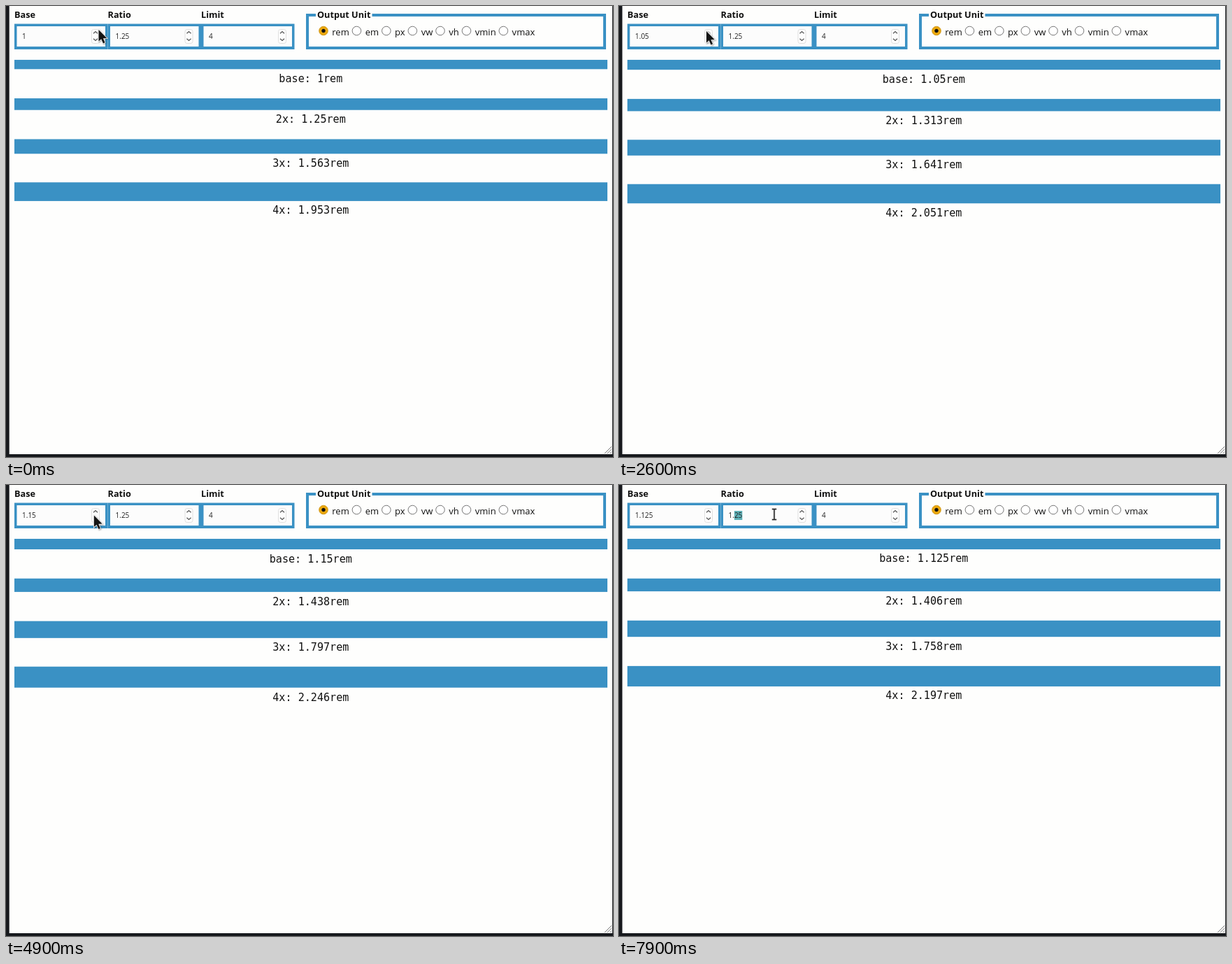
An HTML page with a canvas that plays this animation: 868 px wide and 645 px high, repeating every 8000 ms.

```html
<!DOCTYPE html>
<html lang="en">
<head>
<meta charset="utf-8">
<title>Scale preview</title>
<style>
html, body { margin: 0; width: 100%; height: 100%; overflow: hidden; background: #fefefd; }
canvas { display: block; }
</style>
</head>
<body>
<canvas id="stage" width="868" height="645"></canvas>
<script>
const ctx = document.getElementById('stage').getContext('2d');
const LOOP = 8000, TICK = 100;
const BLUE = '#3a91c4', PAPER = '#fefefd', INK = '#111', EDGE = '#17191d';
const SANS = '"Open Sans", "Noto Sans", sans-serif';
const BOLD = `700 12.7px ${SANS}`, SMALL = `10px ${SANS}`, LABEL = `13px ${SANS}`;
const MONO = '15.1px "DejaVu Sans Mono", monospace';

const STEP = 0.025, RATIO = 1.25, LIMIT = 4;
const UP_CLICKS = [2000, 2600, 2900, 3200, 3700, 3900], DOWN_CLICK = 5300;
const CARET_AT = 7500, SELECT_AT = 7900;
const UNITS = ['rem', 'em', 'px', 'vw', 'vh', 'vmin', 'vmax'];

// Pointer moves: start, end, destination
const HOME = { x: 132, y: 34 };
const MOVES = [
  [1000, 1100, 124.5, 36],
  [4600, 5000, 125.5, 45],
  [6300, 6900, 258, 43],
  [7000, 7200, 231, 43],
  [7400, 7500, 222, 42]
];

const trim = v => String(Math.round(v * 1000 + 1e-6) / 1000);
const ease = k => k * k * (3 - 2 * k);

function baseAt(t) {
  const ups = UP_CLICKS.filter(c => c <= t).length;
  return 1 + STEP * (ups - (t >= DOWN_CLICK));
}

function pointerAt(t) {
  const now = Math.floor(t / TICK) * TICK;
  let { x, y } = HOME;
  for (const [start, end, toX, toY] of MOVES) {
    const k = ease(Math.min(1, Math.max(0, (now - start) / (end - start))));
    x += (toX - x) * k;
    y += (toY - y) * k;
  }
  return { x, y, overText: x > 149 && x < 252 };
}

function rect(color, x, y, w, h) {
  ctx.fillStyle = color;
  ctx.fillRect(x, y, w, h);
}

function text(str, x, y, font, color = INK, align = 'left') {
  ctx.font = font;
  ctx.fillStyle = color;
  ctx.textAlign = align;
  ctx.fillText(str, x, y);
}

function line(points, color, width) {
  ctx.beginPath();
  points.forEach(p => ctx.lineTo(...p));
  ctx.strokeStyle = color;
  ctx.lineWidth = width;
  ctx.stroke();
}

function disc(x, y, r, fill, stroke = fill) {
  ctx.beginPath();
  ctx.arc(x, y, r, 0, Math.PI * 2);
  ctx.fillStyle = fill;
  ctx.fill();
  ctx.strokeStyle = stroke;
  ctx.lineWidth = 1;
  ctx.stroke();
}

function spinner(x, pointer) {
  ctx.beginPath();
  ctx.roundRect(x - 5.5, 33.5, 11, 20, 3);
  ctx.fillStyle = '#fdfdfd';
  ctx.fill();
  ctx.strokeStyle = '#e0e0e0';
  ctx.lineWidth = 1;
  ctx.stroke();
  const near = !pointer.overText && Math.abs(pointer.x - x) < 4;
  for (const dir of [-1, 1]) {
    const y = 43 + dir * 5;
    const hover = near && dir * (pointer.y - 43) > 0;
    line([[x - 3, y - dir * 1.3], [x, y + dir * 1.5], [x + 3, y - dir * 1.3]],
      hover ? '#c4c4c4' : '#555', 1.2);
  }
}

function field(index, label, value, pointer, decorate) {
  const x = 12 + index * 133.5;
  text(label, x, 17, BOLD);
  rect(BLUE, x, 25.5, 133.5, 36.5);
  rect('#fcfcfc', x + 3.5, 29, 126.5, 29);
  spinner(x + 116, pointer);
  if (decorate) decorate(x + 11);
  text(value, x + 11, 47, SMALL, '#222');
}

function ratioMarks(x, t) {
  ctx.font = SMALL;
  const from = x + ctx.measureText('1.').width;
  const to = x + ctx.measureText('1.25').width;
  if (t >= SELECT_AT) rect('#5fb1b7', from, 37, to - from, 13);
  else if (t >= CARET_AT) rect('#333', to, 37, 1, 13);
}

function unitPicker() {
  rect(BLUE, 429, 11, 429, 51);
  rect(PAPER, 433, 15, 421, 43);
  rect(PAPER, 443, 10, 80.5, 6);
  text('Output Unit', 445, 17, BOLD);
  let x = 454;
  UNITS.forEach((name, i) => {
    disc(x, 35.5, 6.3, i ? '#fff' : '#eba80f', i ? '#777' : '#d29a1c');
    if (!i) disc(x, 35.5, 2.3, INK);
    text(name, x + 12.3, 41.5, LABEL);
    x += 12.3 + ctx.measureText(name).width + 10.7;
  });
}

// Bars are laid out on a 16-unit rem grid, then scaled to the stage.
function bars(base) {
  const px = u => u * 0.8345 + 0.2;
  let top = 92;
  for (let i = 0; i < LIMIT; i++) {
    const size = base * RATIO ** i;
    const bottom = top + size * 16;
    const y = px(Math.round(top));
    rect(BLUE, 12, y, 848, px(Math.round(bottom)) - y);
    text(`${i ? i + 1 + 'x' : 'base'}: ${trim(size)}rem`, 435.8,
      Math.round(px(Math.floor(bottom + 22.88))), MONO, INK, 'center');
    top = bottom + 49.75;
  }
}

function arrow(x, y) {
  ctx.save();
  ctx.translate(x, y);
  ctx.beginPath();
  [[0.5, 0], [0.5, 16.5], [4.2, 13.2], [7, 19.5], [9.6, 18.3], [6.9, 12.2], [12.2, 12]]
    .forEach(p => ctx.lineTo(...p));
  ctx.closePath();
  ctx.shadowColor = 'rgba(0,0,0,0.35)';
  ctx.shadowBlur = 2;
  ctx.shadowOffsetX = ctx.shadowOffsetY = 1;
  ctx.strokeStyle = '#f4f4f4';
  ctx.lineWidth = 1.6;
  ctx.stroke();
  ctx.shadowColor = 'transparent';
  ctx.fillStyle = '#151515';
  ctx.fill();
  ctx.restore();
}

function beam(x, y) {
  for (const [color, width] of [['#e2e2e2', 3.4], ['#222', 1.5]]) {
    line([[x, y - 7.5], [x, y + 7.5]], color, width);
    for (const end of [y - 7.5, y + 7.5]) line([[x - 3.2, end], [x + 3.2, end]], color, width);
  }
}

function windowEdges() {
  rect(EDGE, 0, 0, 4.7, 645);
  rect(EDGE, 867, 0, 1, 645);
  rect(EDGE, 0, 641, 868, 4);
  for (let d = 2.5; d < 11; d += 3.75) line([[866 - d, 640], [866, 640 - d]], '#777', 1);
}

function draw(t) {
  const base = baseAt(t);
  const pointer = pointerAt(t);
  rect(PAPER, 0, 0, 868, 645);
  field(0, 'Base', trim(base), pointer);
  field(1, 'Ratio', trim(RATIO), pointer, x => ratioMarks(x, t));
  field(2, 'Limit', trim(LIMIT), pointer);
  unitPicker();
  bars(base);
  windowEdges();
  (pointer.overText ? beam : arrow)(pointer.x, pointer.y);
}

function tick() {
  draw(performance.now() % LOOP);
  requestAnimationFrame(tick);
}
tick();
</script>
</body>
</html>
```
